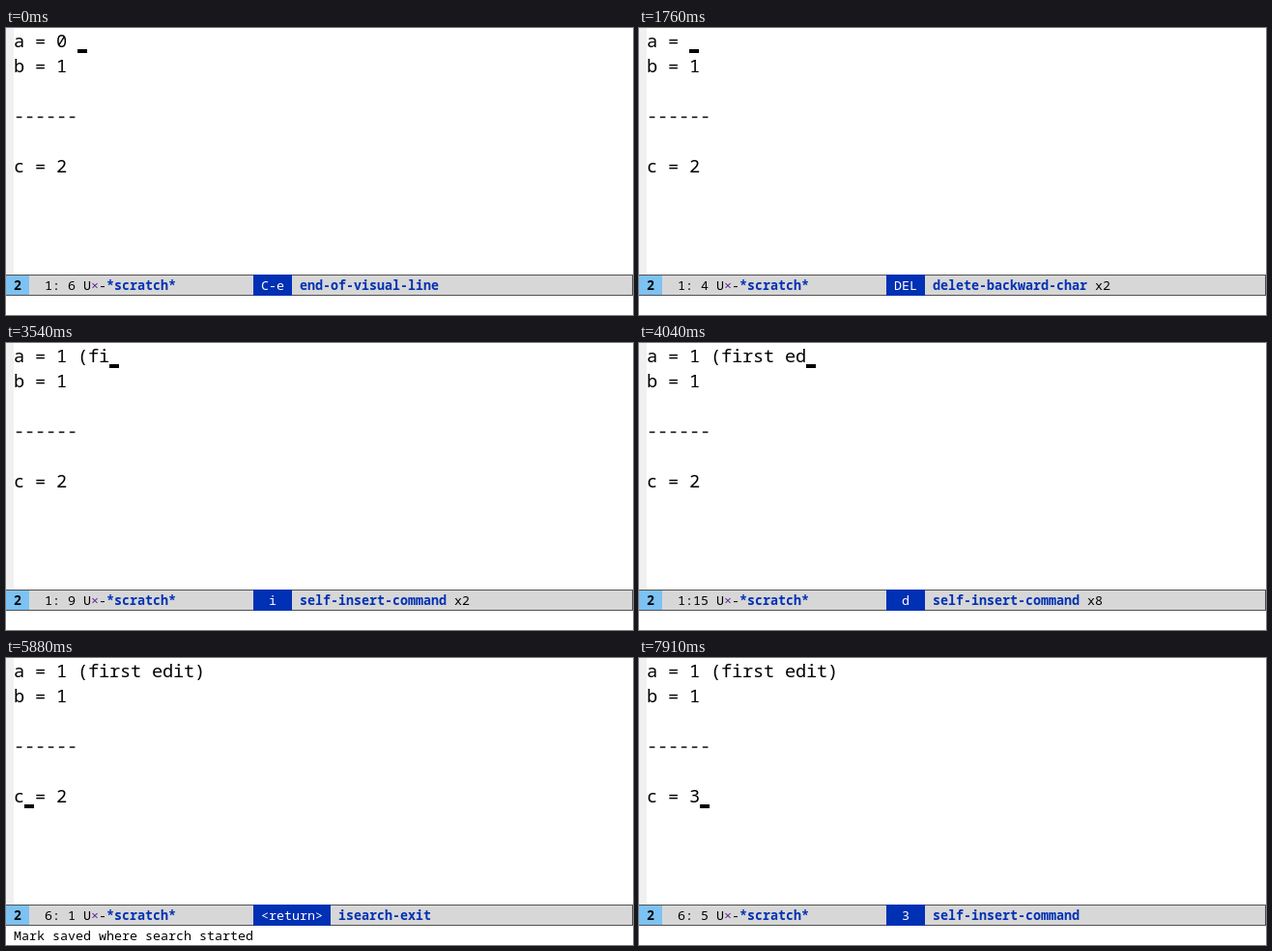
Write an HTML page that moves like this. It is 649 by 298 pixels and loops after 8 s.

```html
<!DOCTYPE html>
<html lang="en">
<head>
<meta charset="utf-8">
<title>Editing two lines</title>
<style>
  html, body { margin: 0; width: 100%; height: 100%; overflow: hidden; background: #fff; }
  svg { display: block; }
  text { font: 13.333px "Noto Sans Mono", monospace; white-space: pre; }
  .code { font-size: 18.667px; letter-spacing: -.2px; }
  .bold { font-weight: bold; }
</style>
</head>
<body>
<svg id="stage" width="649" height="298"></svg>
<script>
const LOOP = 8000, COL = 11, ROW = 26, CHAR = 8;
const BLUE = '#0030b4', INK = '#000', PROMPT = '#005a5f';
const MATCH = '#c488ff', MISMATCH = '#ff8892';
const INSERT = 'self-insert-command', DELETE = 'delete-backward-char';
const END = 'end-of-visual-line', WRAP = '(lambda (arg) (interactive p) (wrap-region-';
const FIRST = 'a = 1 (first edit)';

// time, row, text of the edited row, key, command, repeat count, extras
const steps = [
  [0, 0, 'a = 0 ', 'C-e', END],
  [1000, 0, 'a = 0', 'DEL', DELETE],
  [1760, 0, 'a = ', 'DEL', DELETE, 2],
  [1960, 0, 'a = 1', '1', INSERT],
  [2440, 0, 'a = 1 ', 'SPC', INSERT, 2],
  [2750, 0, 'a = 1 (', '(', WRAP],
  [3250, 0, 'a = 1 (', '(', WRAP, 1, { marks: [6], mark: MISMATCH }],
  ...typed([[3410, 1], [3500, 2], [3590, 3], [3670, 5], [3850, 6], [3950, 7], [4040, 8], [4240, 9], [4290, 10]]),
  [4640, 0, FIRST, ')', INSERT, 11, { marks: [6, 17], mark: MATCH, echo: 'I-search: ', tint: PROMPT }],
  [5670, 0, FIRST, 'C-s', 'isearch-forward', 1,
    { marks: [6, 17], mark: MATCH, echo: 'I-search: ', tint: PROMPT, query: 'c' }],
  [5880, 5, 'c = 2 ', '<return>', 'isearch-exit', 1, { col: 1, echo: 'Mark saved where search started' }],
  [6390, 5, 'c = 2 ', 'C-e', END],
  [6730, 5, 'c = 2', 'DEL', DELETE],
  [7710, 5, 'c = ', 'DEL', DELETE, 2],
  [7910, 5, 'c = 3', '3', INSERT]
];

function typed(list) {
  return list.map(([time, n]) => {
    const line = FIRST.slice(0, 7 + n), last = line.at(-1);
    return [time, 0, line, last === ' ' ? 'SPC' : last, INSERT, n];
  });
}

const rect = (x, y, w, h, fill) =>
  `<rect x="${x}" y="${y}" width="${w}" height="${h}" fill="${fill}"/>`;
const text = (x, y, str, fill = INK, cls = '') =>
  `<text x="${x}" y="${y}" fill="${fill}" class="${cls}">${str.replace(/</g, '&lt;')}</text>`;

function buffer(row, line, col, marks, mark) {
  const lines = [FIRST, 'b = 1', '', '------', '', 'c = 2'];
  lines[row] = line;
  return rect(0, 0, 8, 256, '#f0f0f0') +
    marks.map(c => rect(8 + c * COL, 0, COL, ROW, mark)).join('') +
    lines.map((str, i) => text(8, i * ROW + 20, str, INK, 'code')).join('') +
    rect(8 + col * COL, row * ROW + 22, 10, 4, INK);
}

function modeLine(row, col, key, command, count) {
  const y = 272, width = Math.max(5, key.length + 2) * CHAR;
  const keyX = 256 + (width - key.length * CHAR) / 2;
  const commandX = 256 + width + CHAR;
  return rect(0, 256, 649, 22, '#505050') +
    rect(1, 257, 647, 20, '#d7d7d7') +
    rect(0, 257, 24, 20, '#7cc2f2') +
    text(8, y, '2', INK, 'bold') +
    text(40, y, `${row + 1}:${String(col).padStart(2)}`) +
    text(80, y, 'U') + text(88, y, '×', '#5c2092') + text(96, y, '-') +
    text(104, y, '*scratch*', BLUE, 'bold') +
    rect(256, 256, width, 22, BLUE) +
    text(keyX, y, key, '#fff') +
    text(commandX, y, command, BLUE, 'bold') +
    (count > 1 ? text(commandX + (command.length + 1) * CHAR, y, 'x' + count) : '');
}

function draw([, row, line, key, command, count = 1, extra = {}]) {
  const { col = line.length, marks = [], mark, echo = '', tint = INK, query = '' } = extra;
  stage.innerHTML = buffer(row, line, col, marks, mark) +
    modeLine(row, col, key, command, count) +
    text(8, 293, echo, tint) +
    text(8 + echo.length * CHAR, 293, query);
}

const stage = document.getElementById('stage');
let shown, start;
function tick(now) {
  start ??= now;
  const time = (now - start) % LOOP;
  const step = steps.findLast(s => s[0] <= time) || steps[0];
  if (step !== shown) draw(shown = step);
  requestAnimationFrame(tick);
}
draw(shown = steps[0]);
requestAnimationFrame(tick);
</script>
</body>
</html>
```
